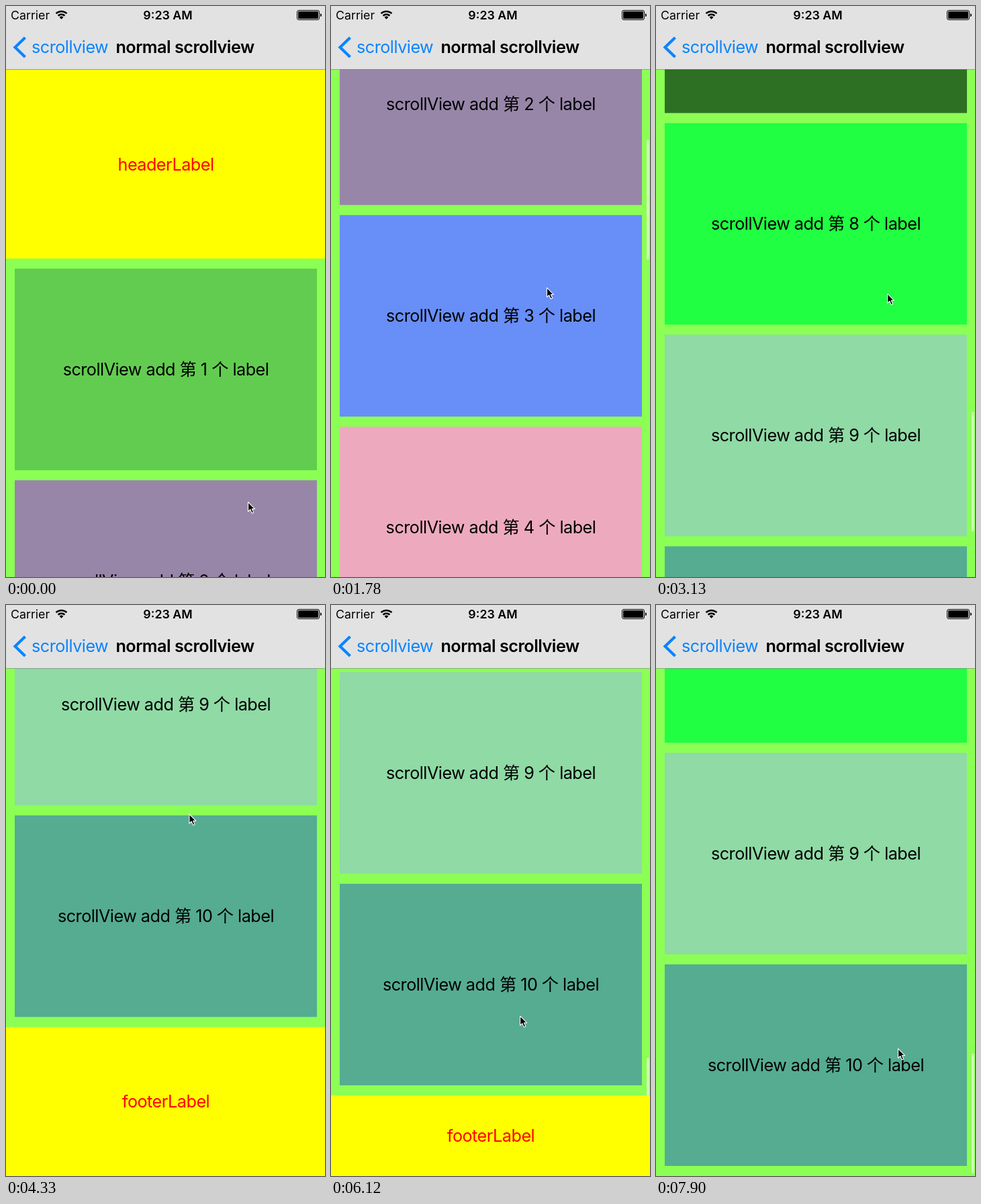
An HTML page that plays this animation: 475x850 px, repeating every 8000 ms.

```html
<!DOCTYPE html>
<html lang="zh-Hans">
<head>
<meta charset="utf-8">
<title>Stretchy scroll view</title>
<style>
  html, body { margin: 0; width: 100%; height: 100%; overflow: hidden; background: #8cff55; }
  svg { display: block; }
  text { font: 25.2px Inter, "Noto Sans CJK SC", "Noto Sans CJK JP", "Noto Sans CJK", sans-serif; letter-spacing: -.02em; }
  .mid { text-anchor: middle; }
  .bold { font-weight: 600; }
  .status { font-size: 17.8px; letter-spacing: 0; }
</style>
</head>
<body>
<svg id="stage" width="475" height="850" viewBox="0 0 475 850">
  <rect width="475" height="850" fill="#8cff55"/>
  <g id="list"></g>
  <rect id="bar" x="470" width="3.6" rx="1.8" fill="#fff" fill-opacity=".6"/>
  <svg id="header" x="0" y="95" width="475">
    <rect width="475" height="100%" fill="#ff0"/>
    <text class="mid" x="238" fill="#f00">headerLabel</text>
  </svg>
  <svg id="footer" x="0" width="475">
    <rect width="475" height="100%" fill="#ff0"/>
    <text class="mid" x="238" fill="#f00">footerLabel</text>
  </svg>

  <rect width="475" height="94" fill="#e2e2e2"/>
  <rect y="94" width="475" height="1" fill="#000" fill-opacity=".38"/>
  <rect y="94" width="475" height="1" fill="#e2e2e2" fill-opacity=".3"/>
  <text class="status" x="7" y="20">Carrier</text>
  <g fill="none" stroke="#000" stroke-width="2.5">
    <path d="M74.5 11.2a11.6 11.6 0 0 1 16 0M77.6 14.5a7 7 0 0 1 9.8 0"/>
    <path d="M82.5 19.8l-2.9-3a4.1 4.1 0 0 1 5.8 0z" fill="#000" stroke="none"/>
  </g>
  <text class="status bold mid" x="241" y="20">9:23 AM</text>
  <rect x="433.5" y="6.5" width="33" height="14" rx="2.5" fill="none" stroke="#000"/>
  <rect x="435" y="8" width="30" height="11" rx="1.2"/>
  <path d="M468 11q2 .5 2 2.5t-2 2.5z"/>
  <path d="M28.5 47L13.5 61.5L28.5 76" fill="none" stroke="#0a84ff" stroke-width="4.2"/>
  <text x="38" y="70" fill="#0a84ff">scrollview</text>
  <text class="bold mid" x="266.5" y="70">normal scrollview</text>

  <path id="cursor" d="M.5 .5V14.5L3.7 11.5L6.2 17L8.7 15.9L6.3 10.6H10.5Z" stroke="#fff" stroke-width="1.1" stroke-linejoin="round"/>
</svg>
<script>
const LOOP = 8000, FRAME = 149;
const TOP = 95, BOTTOM = 850, PAGE = BOTTOM - TOP;
const PITCH = 315, CONTENT = 10 * PITCH + 15, MAX = CONTENT - PAGE;
const COLORS = ['#62cc50', '#9886a9', '#688ef7', '#edaabf', '#c4a45e',
                '#4626d1', '#2d7023', '#20ff42', '#8fdaa5', '#55ac91'];

// [time, offset]: negative offsets stretch the header, offsets past MAX the footer
const SCROLL = [
  [0, -281], [150, -270], [300, -180], [450, -135], [600, -120], [1190, -120],
  [1340, -60], [1480, 60], [1630, 220], [1780, 418], [2080, 830], [2230, 1080],
  [2380, 1340], [2530, 1599], [2830, 1900], [3130, 2141.5], [3430, 2410],
  [3650, 2425], [3900, 2500], [4330, 2634], [4480, 2664], [4630, 2664],
  [5000, 2720], [5350, 2735], [5520, 2690], [5670, 2570], [5820, 2538],
  [5970, 2530], [6860, 2530], [7010, 2480], [7160, 2425], [7310, 2410], [8000, 2410]
];

// [time, x, y] of the pointer tip
const POINTER = [
  [0, 360, 738], [600, 358, 735], [1190, 352, 730], [1330, 348, 720],
  [1780, 321, 425], [2230, 330, 44], [2530, 374, 568], [2680, 378, 690],
  [2830, 370, 660], [3130, 344, 427], [3430, 310, 180], [3750, 330, 760],
  [4330, 272, 304], [4480, 268, 200], [4630, 268, 200], [5000, 262, 60],
  [5400, 262, 8], [5670, 262, 12], [5820, 265, 67], [6120, 282, 616],
  [6500, 330, 670], [7900, 360, 660]
];

// Monotone cubic curve through one column of a track
function sample(track, t, col = 1) {
  const last = track.length - 1;
  if (t >= track[last][0]) return track[last][col];
  const i = track.findIndex(key => key[0] > t) - 1;
  const slope = k => (track[k + 1][col] - track[k][col]) / (track[k + 1][0] - track[k][0]);
  const tangent = k => {
    if (k === 0 || k === last) return 0;
    const a = slope(k - 1), b = slope(k);
    return a * b > 0 ? 2 * a * b / (a + b) : 0;
  };
  const span = track[i + 1][0] - track[i][0];
  const u = (t - track[i][0]) / span, v = 1 - u;
  return v * v * (1 + 2 * u) * track[i][col] + u * u * (3 - 2 * u) * track[i + 1][col]
       + span * u * v * (v * tangent(i) - u * tangent(i + 1));
}

const $ = id => document.getElementById(id);
const set = (node, attrs) => Object.entries(attrs).forEach(([k, v]) => node.setAttribute(k, v));

$('list').innerHTML = COLORS.map((color, i) => `
  <g transform="translate(0 ${110 + i * PITCH})">
    <rect x="13" width="450" height="300" fill="${color}"/>
    <text class="mid" x="238" y="159">scrollView add 第 ${i + 1} 个 label</text>
  </g>`).join('');

function stretch(id, y, height) {
  const node = $(id);
  set(node, { y, height, visibility: height > 0 ? 'visible' : 'hidden' });
  set(node.querySelector('text'), { y: height / 2 + 9 });
}

function draw(t) {
  const offset = sample(SCROLL, t);
  const above = Math.max(0, -offset), below = Math.max(0, offset - MAX);
  set($('list'), { transform: `translate(0 ${-offset})` });
  stretch('header', TOP, above);
  stretch('footer', BOTTOM - below, below);

  const track = 748;
  const length = track * PAGE / (CONTENT + above + below);
  const progress = Math.min(1, Math.max(0, offset / MAX));
  set($('bar'), { y: 98 + (track - length) * progress, height: length });

  set($('cursor'), { transform: `translate(${sample(POINTER, t)} ${sample(POINTER, t, 2)})` });
}

function tick(now) {
  const t = now % LOOP;
  draw(Math.floor((t + 10) / FRAME) * FRAME);
  requestAnimationFrame(tick);
}
draw(0);
requestAnimationFrame(tick);
</script>
</body>
</html>
```
